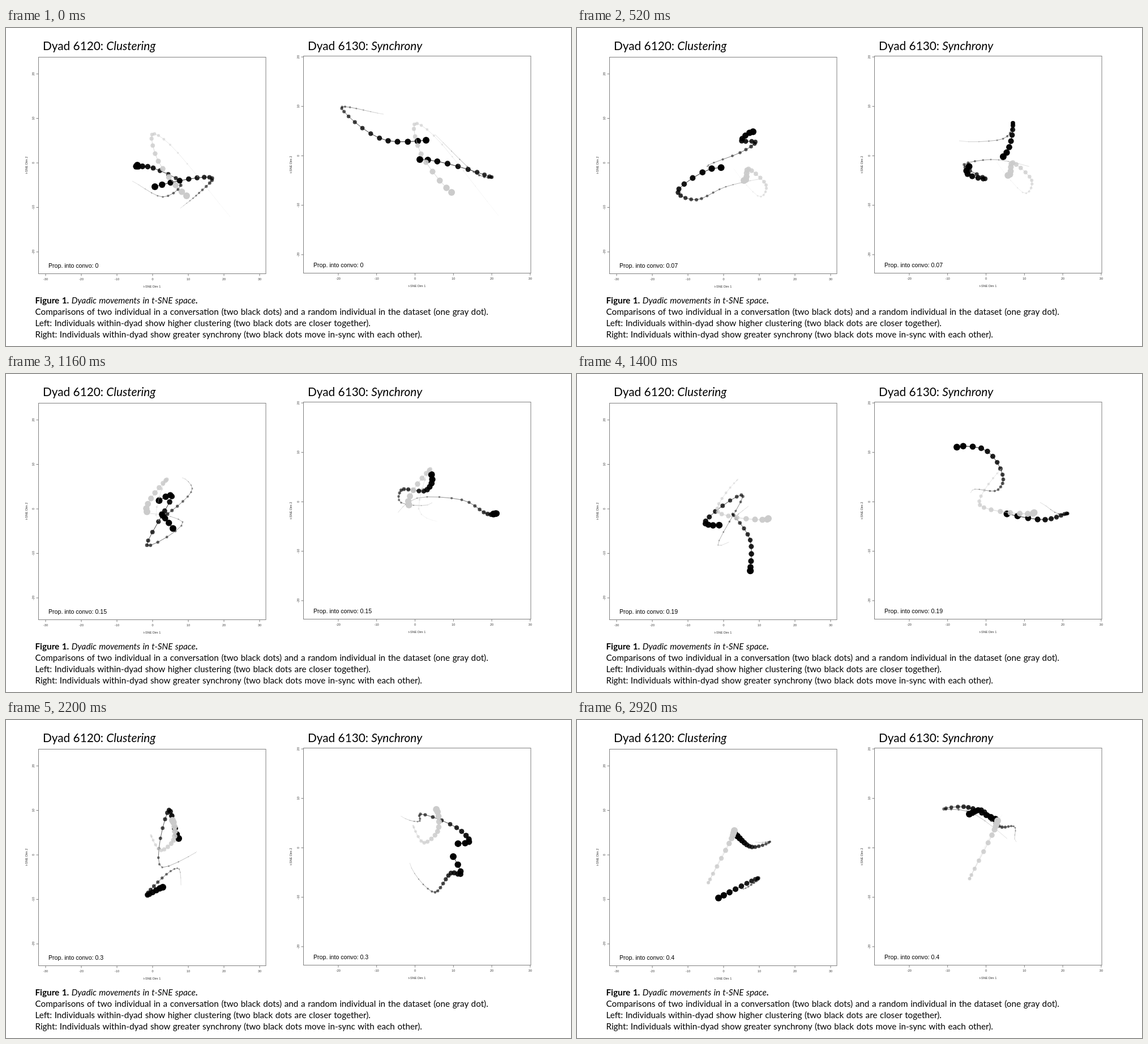
An HTML page with a canvas that plays this animation: 998x561 px, repeating every 2960 ms.

```html
<!DOCTYPE html>
<html lang="en">
<head>
<meta charset="utf-8">
<title>Dyadic movements</title>
<style>
html, body { margin: 0; width: 100%; height: 100%; overflow: hidden; background: #fff; }
canvas, svg { position: absolute; left: 0; top: 0; width: 998px; height: 561px; }
.title { font: 20.8px Lato, sans-serif; }
.caption { font: 15.25px Lato, sans-serif; word-spacing: .75px; }
.prop { font: 10.6px "Liberation Sans", Arial, sans-serif; }
.axis { font: 5.5px "Liberation Sans", Arial, sans-serif; text-anchor: middle; fill: #333; }
.frame { fill: none; stroke: #808080; stroke-width: 1; }
.i { font-style: italic; }
.b { font-weight: bold; }
</style>
</head>
<body>
<canvas width="998" height="561"></canvas>
<svg viewBox="0 0 998 561"></svg>
<script>
const TRAIL = 20, STEPS_PER_FRAME = 1.2, FRAME_MS = 40, LOOP_MS = 2960;

// Turning points of each speaker as step, x, y; a smooth curve joins them.
const clusterA = [
  -19,223,270, -14,277,298, -9,308,271, -5,260,247, 0,232,242, 4,288,220, 8,315,201,
  11,291,199, 15,311,183, 19,329,202, 26,280,251, 31,277,249, 36,306,293, 41,306,347,
  50,306,263, 61,250,309, 66,277,295, 71,294,298, 79,319,279, 87,250,314];
const clusterB = [
  -19,308,318, -13,341,291, -8,364,265, 0,263,280, 5,211,303, 10,180,284, 14,238,248,
  19,312,261, 25,249,302, 31,293,216, 39,227,264, 43,264,264, 47,337,232, 52,276,260,
  60,288,159, 66,305,209, 74,341,215, 80,309,224, 87,279,201];
const syncA = [
  -19,667,152, -11,593,142, -4,675,199, 0,742,198, 8,770,168, 16,745,231, 20,698,227,
  24,698,205, 30,744,204, 33,753,186, 39,714,131, 42,671,129, 46,691,164, 52,731,178,
  55,732,166, 60,796,190, 64,818,215, 68,776,215, 72,774,190, 78,745,187, 83,714,159, 87,693,166];
const syncB = [
  -19,758,188, -14,826,254, -9,858,263, 0,731,232, 4,684,241, 9,721,266, 14,688,252,
  18,726,219, 22,805,222, 26,844,244, 34,861,247, 38,827,257, 45,718,242, 54,758,304,
  60,786,270, 64,803,267, 66,790,241, 71,704,167, 76,648,157, 80,683,153, 87,739,175];
const random = [
  -19,396,333, -13,290,206, -9,258,188, -5,269,235, 0,319,296, 5,334,277, 10,303,249,
  15,295,269, 19,265,249, 22,275,203, 26,284,186, 34,249,243, 42,338,255, 48,268,226,
  52,256,203, 57,274,230, 61,296,212, 66,294,177, 77,232,287, 84,273,209, 87,278,195];

const panels = [
  { box: [57.5, 51.5, 401.5, 382], x0: 259, y0: 238, ux: 6.3, uy: 7.85, xMin: -30,
    name: [65, 39, 'Dyad 6120: ', 'Clustering'], prop: [75, 422.5], xName: [258, 458], yName: [37.5, 242] },
  { box: [525.5, 49.5, 401.5, 383], x0: 722.5, y0: 225.5, ux: 6.78, uy: 8.72, xMin: -20,
    name: [533, 39, 'Dyad 6130: ', 'Synchrony'], prop: [543, 421.5], xName: [726, 457], yName: [505, 241] }
];
const [left, right] = panels;

const svg = document.querySelector('svg');
const text = (cls, x, y, s, extra = '') => `<text class="${cls}" x="${x}" y="${y}" ${extra}>${s}</text>`;
const upright = (x, y, s) => text('axis', x, y, s, `transform="rotate(-90 ${x} ${y})"`);
const span = (cls, s) => `<tspan class="${cls}">${s}</tspan>`;

function panelMarkup(p) {
  const [bx, by, w, h] = p.box, bottom = by + h;
  let ticks = '', labels = '';
  for (let v = p.xMin; v <= 30; v += 10) {
    const x = p.x0 + v * p.ux;
    ticks += `M${x} ${bottom}v4`;
    labels += text('axis', x, bottom + 11.5, v);
  }
  for (let v = -20; v <= 20; v += 10) {
    const y = p.y0 - v * p.uy;
    ticks += `M${bx} ${y}h-4`;
    labels += upright(bx - 7.5, y, v);
  }
  const [nx, ny, plain, italic] = p.name;
  return `<rect class="frame" x="${bx}" y="${by}" width="${w}" height="${h}"/><path class="frame" d="${ticks}"/>`
    + labels + text('axis', ...p.xName, 't-SNE Dim 1') + upright(...p.yName, 't-SNE Dim 2')
    + text('title', nx, ny, plain + span('i', italic), 'xml:space="preserve"')
    + text('prop live', ...p.prop, '');
}

const caption = [
  span('b', 'Figure 1.') + ' ' + span('i', 'Dyadic movements in t-SNE space') + span('b', '.'),
  'Comparisons of two individual in a conversation (two black dots) and a random individual in the dataset (one gray dot).',
  'Left: Individuals within-dyad show higher clustering (two black dots are closer together).',
  'Right: Individuals within-dyad show greater synchrony (two black dots move in-sync with each other).'
];
svg.innerHTML = panels.map(panelMarkup).join('')
  + caption.map((s, i) => text('caption', 51.5, 485.5 + i * 20, s)).join('');

const live = svg.querySelectorAll('.live');
const ctx = document.querySelector('canvas').getContext('2d');

// Cubic Hermite curve through unevenly timed keys.
function curve(track) {
  const keys = [];
  for (let i = 0; i < track.length; i += 3) keys.push(track.slice(i, i + 3));
  const last = keys.length - 1;
  const rate = (i, a) => (keys[i + 1][a] - keys[i][a]) / (keys[i + 1][0] - keys[i][0]);
  const slope = (i, a) => {
    if (i === 0) return rate(0, a);
    if (i === last) return rate(last - 1, a);
    const before = keys[i][0] - keys[i - 1][0], after = keys[i + 1][0] - keys[i][0];
    return (rate(i - 1, a) * after + rate(i, a) * before) / (before + after);
  };
  return step => {
    let i = 0;
    while (i < last - 1 && keys[i + 1][0] <= step) i++;
    const span = keys[i + 1][0] - keys[i][0], t = (step - keys[i][0]) / span, u = 1 - t;
    return [1, 2].map(a => u * u * (1 + 2 * t) * keys[i][a] + t * t * (3 - 2 * t) * keys[i + 1][a]
      + span * t * u * (u * slope(i, a) - t * slope(i + 1, a)));
  };
}

// The random speaker has the same data in both panels.
const randomLeft = curve(random);
const randomRight = step => {
  const [x, y] = randomLeft(step);
  return [right.x0 + (x - left.x0) * right.ux / left.ux, right.y0 + (y - left.y0) * right.uy / left.uy];
};
const speakers = [
  ...[clusterA, clusterB, syncA, syncB].map(track => ({ at: curve(track), color: '#000' })),
  ...[randomLeft, randomRight].map(at => ({ at, color: '#cbcbcb' }))
];

function drawTrail({ at, color }, step) {
  ctx.fillStyle = ctx.strokeStyle = color;
  ctx.lineWidth = 0.9;
  let prev;
  for (let k = TRAIL - 1; k >= 0; k--) {
    const age = k / TRAIL, [x, y] = at(step - k);
    ctx.globalAlpha = 1 - age ** 1.5;
    if (prev) {
      ctx.beginPath();
      ctx.moveTo(...prev);
      ctx.lineTo(x, y);
      ctx.stroke();
    }
    ctx.beginPath();
    ctx.arc(x, y, 6 * (1 - age), 0, 2 * Math.PI);
    ctx.fill();
    prev = [x, y];
  }
}

function draw() {
  const frame = Math.floor(performance.now() % LOOP_MS / FRAME_MS);
  const step = Math.floor(frame * STEPS_PER_FRAME + 1e-6);
  ctx.clearRect(0, 0, 998, 561);
  for (const speaker of speakers) drawTrail(speaker, step);
  for (const el of live) el.textContent = 'Prop. into convo: ' + +(step / 220).toFixed(2);
  requestAnimationFrame(draw);
}
draw();
</script>
</body>
</html>
```
